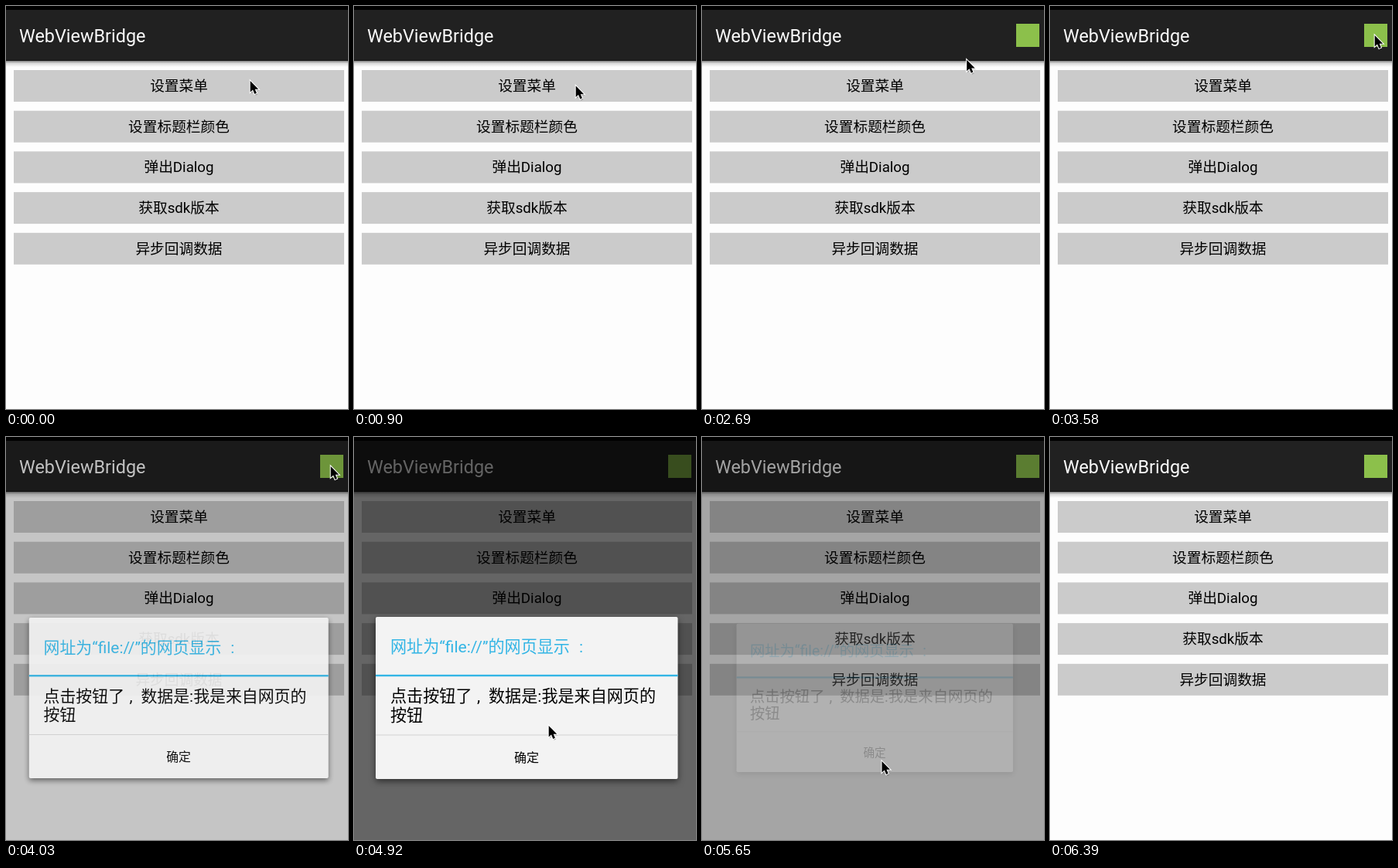
Write an HTML page that moves like this. It is 442 px wide and 522 px high and loops after 6650 ms.

```html
<!DOCTYPE html>
<html lang="zh-CN">
<head>
<meta charset="utf-8">
<title>WebViewBridge</title>
<style>
  html, body { margin: 0; width: 100%; height: 100%; overflow: hidden; background: #fdfdfd; }
  svg { display: block; width: 442px; height: 522px; }
  text { font-family: Roboto, "Noto Sans CJK SC", "Noto Sans CJK", sans-serif; white-space: pre; }
  .label { font-size: 18.7px; text-anchor: middle; }
  .panel { fill: #f3f3f3; filter: drop-shadow(0 3px 4px rgba(0, 0, 0, .55)); }
  .dialog { font-size: 21.1px; }
  .accent { fill: #33b5e5; }
  .ok { font-size: 16px; text-anchor: middle; }
</style>
</head>
<body>
<svg viewBox="0 0 442 522">
  <defs>
    <linearGradient id="shade" x2="0" y2="1">
      <stop offset="0" stop-color="#000" stop-opacity=".5"/>
      <stop offset=".4" stop-color="#000" stop-opacity=".14"/>
      <stop offset="1" stop-color="#000" stop-opacity="0"/>
    </linearGradient>
  </defs>

  <rect width="442" height="522" fill="#fdfdfd"/>
  <rect width="442" height="71" fill="#212121"/>
  <rect width="442" height="5" fill="#000"/>
  <rect y="70" width="442" height="1" fill="#141414"/>
  <rect y="71" width="442" height="8" fill="url(#shade)"/>
  <text x="17" y="47" font-size="23.4" fill="#fafafa">WebViewBridge</text>
  <rect id="icon" x="406" y="23" width="30" height="30" fill="#8cc04b"/>
  <g id="buttons"></g>
  <rect id="dim" width="442" height="522"/>

  <g id="dialog" class="dialog">
    <rect class="panel" x="28" y="233" width="390.5" height="210" rx="2"/>
    <rect id="okPress" class="accent" x="28" y="387" width="390.5" height="56" fill-opacity=".6"/>
    <rect class="accent" x="28" y="307.8" width="390.5" height="2.4"/>
    <rect x="28" y="385.5" width="390.5" height="1" fill="#d2d2d2"/>
    <g class="accent">
      <text x="47" y="279.3">网址为“file://”的网页显示</text>
      <text x="291" y="279.3">:</text>
    </g>
    <text y="343"><tspan x="47">点击按钮了</tspan><tspan x="159">,</tspan><tspan x="174">数据是:我是来自网页的</tspan></text>
    <text x="47" y="367.7">按钮</text>
    <text class="ok" x="223" y="421">确定</text>
  </g>

  <g id="cursor">
    <path d="M1.2 1.5v15l3.4-3 2.3 5.3 2.6-1.1-2.2-5.1h4.6z" opacity=".25"/>
    <path d="M0 0v14.6l3.3-3 2.3 5.3 2.6-1.1-2.2-5.1h4.5z" stroke="#fff" stroke-width="2" paint-order="stroke"/>
  </g>
</svg>
<script>
const LOOP = 6650, TICK = 148.5; // the picture advances once per tick
const $ = id => document.getElementById(id);

function add(tag, attrs, text = '') {
  const el = document.createElementNS('http://www.w3.org/2000/svg', tag);
  for (const key in attrs) el.setAttribute(key, attrs[key]);
  el.textContent = text;
  $('buttons').append(el);
}

['设置菜单', '设置标题栏颜色', '弹出Dialog', '获取sdk版本', '异步回调数据'].forEach((label, i) => {
  const y = 83 + i * 52.7;
  const box = { x: 10, y, width: 427, height: 41 };
  add('rect', { ...box, fill: '#cbcbcb' });
  if (!i) add('rect', { ...box, id: 'press', class: 'accent', 'fill-opacity': .4 });
  add('text', { class: 'label', x: 223.5, y: y + 27 }, label);
});

// Cursor stops, with the ticks of arrival and departure.
const stops = [
  { x: 315.7, y: 97, leave: 3 },
  { x: 286.7, y: 103.5, arrive: 6, leave: 15 },
  { x: 397.7, y: 36, arrive: 21, leave: 22 },
  { x: 419.7, y: 38, arrive: 24, leave: 29 },
  { x: 251.7, y: 374, arrive: 33, leave: 33 },
  { x: 232.5, y: 420, arrive: 35, leave: 38 },
  { x: 420, y: 540, arrive: 43 }
];

const ramp = (t, a, b) => Math.min(1, Math.max(0, (t - a) / (b - a)));
const ease = p => p * p * (3 - 2 * p);
const within = (t, a, b) => t >= a && t < b ? 1 : 0;
const fade = (id, value) => $(id).setAttribute('opacity', value);

function cursorAt(t) {
  let { x, y } = stops[0];
  for (let i = 1; i < stops.length; i++) {
    const from = stops[i - 1], to = stops[i];
    const p = ease(ramp(t, from.leave, to.arrive));
    x += (to.x - from.x) * p;
    y += (to.y - from.y) * p;
  }
  return `translate(${x} ${y})`;
}

function draw(t) {
  const shown = ramp(t, 26, 27.1) - ramp(t, 37, 38.18);
  const scale = .9 + .1 * shown;
  fade('press', within(t, 8, 10));
  fade('icon', within(t, 11, Infinity));
  fade('dim', .6 * (ramp(t, 26.4, 28) - ramp(t, 37, 39.4)));
  fade('okPress', within(t, 36, 37));
  fade('dialog', shown);
  $('dialog').setAttribute('transform', `translate(223.3 337.7) scale(${scale}) translate(-223.3 -337.7)`);
  $('cursor').setAttribute('transform', cursorAt(t));
}

const start = performance.now();
function loop() {
  draw(Math.floor((performance.now() - start) % LOOP / TICK));
  requestAnimationFrame(loop);
}
loop();
</script>
</body>
</html>
```
